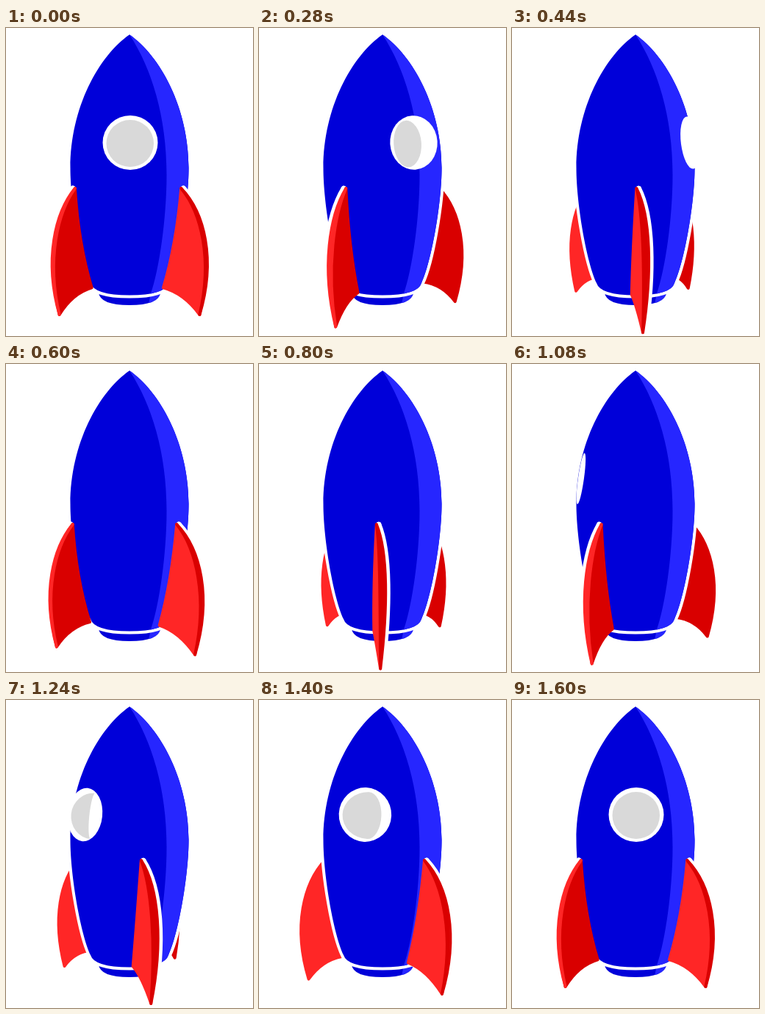
These frames come from a looping animation (336x419 px, 1640 ms). An HTML page with a canvas:

```html
<!DOCTYPE html>
<html>
<head>
<meta charset="utf-8">
<style>
  html, body { margin: 0; width: 100%; height: 100%; overflow: hidden; background: #fff; }
  canvas { display: block; }
</style>
</head>
<body>
<canvas id="stage" width="336" height="419"></canvas>
<script>
const ctx = document.getElementById('stage').getContext('2d');
const { sin, cos, PI } = Math;
const RED = '#ff2626', DARK_RED = '#d90000', BLUE = '#0000d9', LIGHT_BLUE = '#2626ff';
const AXIS = 168, EYE = 217, DEPTH = 445;
const STEP = 40, LOOP = 1640, SPIN = 1600;

const hull = new Path2D(`M168 9 C126 38 87.5 109 87.5 190 C87.5 240 102 320 115 347
  Q120 363.5 168 363.5 Q216 363.5 221 347 C234 320 248.5 240 248.5 190 C248.5 109 210 38 168 9Z`);
const hullLight = new Path2D('M168 9 C198 55 218.5 120 218.5 200 C218.5 260 208 330 197 361 L193 380 L260 380 L260 9Z');
const nozzle = new Path2D('M126 360 L210 360 Q208 377 168 377 Q128 377 126 360Z');

function fill(path, color) {
  ctx.fillStyle = color;
  ctx.fill(path);
}

function fillRounded(path, color, width) {
  ctx.strokeStyle = color;
  ctx.lineWidth = width;
  ctx.lineJoin = 'round';
  ctx.stroke(path);
  fill(path, color);
}

function fillShaded(path) {
  fill(path, BLUE);
  ctx.save();
  ctx.clip(path);
  fill(hullLight, LIGHT_BLUE);
  ctx.restore();
}

// Perspective view of a point at radius r, height y below the eye, sideways offset w.
function projector(angle) {
  return (r, y, w = 0) => {
    const scale = 1 / (1 - r * cos(angle) / DEPTH);
    return [AXIS + (r * sin(angle) + w * cos(angle)) * scale, EYE + y * scale];
  };
}

function drawFin({ angle, front }) {
  const at = projector(angle);
  const right = front ? angle > -0.1 : angle > 0;
  const root = front && right ? -9 : -1;
  const bulge = front ? 0 : 4;
  const top = at(77, 1, right ? -5 : -2), tip = at(98, 154);
  const ridge = w => [at(100 + bulge, 30, w), at(114 + bulge, 85, w)];
  const [upper, lower] = ridge(0);

  const face = new Path2D();
  face.moveTo(...top);
  face.bezierCurveTo(...upper, ...lower, ...tip);
  face.quadraticCurveTo(...at(81, 131, root * 0.6), ...at(55, 128, root));
  face.quadraticCurveTo(...at(73, 70, root), ...top);
  face.closePath();

  if (!front) {
    fillRounded(face, right ? DARK_RED : RED, 4);
    return;
  }
  const [outerUpper, outerLower] = ridge(right ? 8 : -6);
  const edge = new Path2D();
  edge.moveTo(...top);
  edge.bezierCurveTo(...outerUpper, ...outerLower, ...tip);
  edge.bezierCurveTo(...lower, ...upper, ...top);
  edge.closePath();

  ctx.save();
  ctx.translate(right ? 3 : -3, 0);
  fillRounded(edge, '#fff', 7);
  fillRounded(face, '#fff', 7);
  ctx.restore();
  fillRounded(face, right ? RED : DARK_RED, 4);
  fillRounded(edge, right ? DARK_RED : RED, 4);
}

function drawWindow(angle) {
  const c = cos(angle), s = sin(angle);
  if (c < -0.05) return;
  const rx = Math.max(4, 37.5 * cos(1.1 * angle)), ry = 35 + 2 * c;
  ctx.save();
  ctx.translate(projector(angle)(75, 0)[0] + 1, 156);
  ctx.rotate(-0.14 * s);
  ctx.fillStyle = '#fff';
  ctx.beginPath();
  ctx.ellipse(0, 0, rx, ry, 0, 0, 2 * PI);
  ctx.fill();

  const left = 4 + c - rx;
  const edge = 32 - (s > 0 ? 46 : -36) * s;
  const middle = (s > 0 ? -19 : -15) * s;
  if (edge > left) {
    ctx.fillStyle = '#d9d9d9';
    ctx.beginPath();
    ctx.ellipse(middle, 1, Math.max(0, middle - left), ry - 5, 0, PI / 2, 1.5 * PI);
    ctx.ellipse(middle, 1, Math.abs(edge - middle), ry - 5, 0, -PI / 2, PI / 2, edge < middle);
    ctx.fill();
  }
  ctx.restore();
}

const wrap = angle => Math.atan2(sin(angle), cos(angle));

function draw(time) {
  const u = Math.min(1, time / SPIN);
  const degrees = 180 * (1 - cos(PI * u)) + 2.5 * sin(2 * PI * u) - 1.3 * sin(PI * u);
  const turn = degrees * PI / 180;
  const fins = [-1, 1, 3].map(k => {
    const angle = wrap(turn + k * PI / 3);
    return { angle, front: cos(angle) > 0.25 };
  });

  ctx.fillStyle = '#fff';
  ctx.fillRect(0, 0, 336, 419);
  fins.filter(fin => !fin.front).forEach(drawFin);
  fillShaded(nozzle);
  fillRounded(hull, '#fff', 8);
  fillShaded(hull);
  drawWindow(wrap(turn));
  fins.filter(fin => fin.front).forEach(drawFin);
}

let start;
function tick(now) {
  start ??= now;
  draw(Math.floor((now - start) % LOOP / STEP) * STEP);
  requestAnimationFrame(tick);
}
draw(0);
requestAnimationFrame(tick);
</script>
</body>
</html>
```
